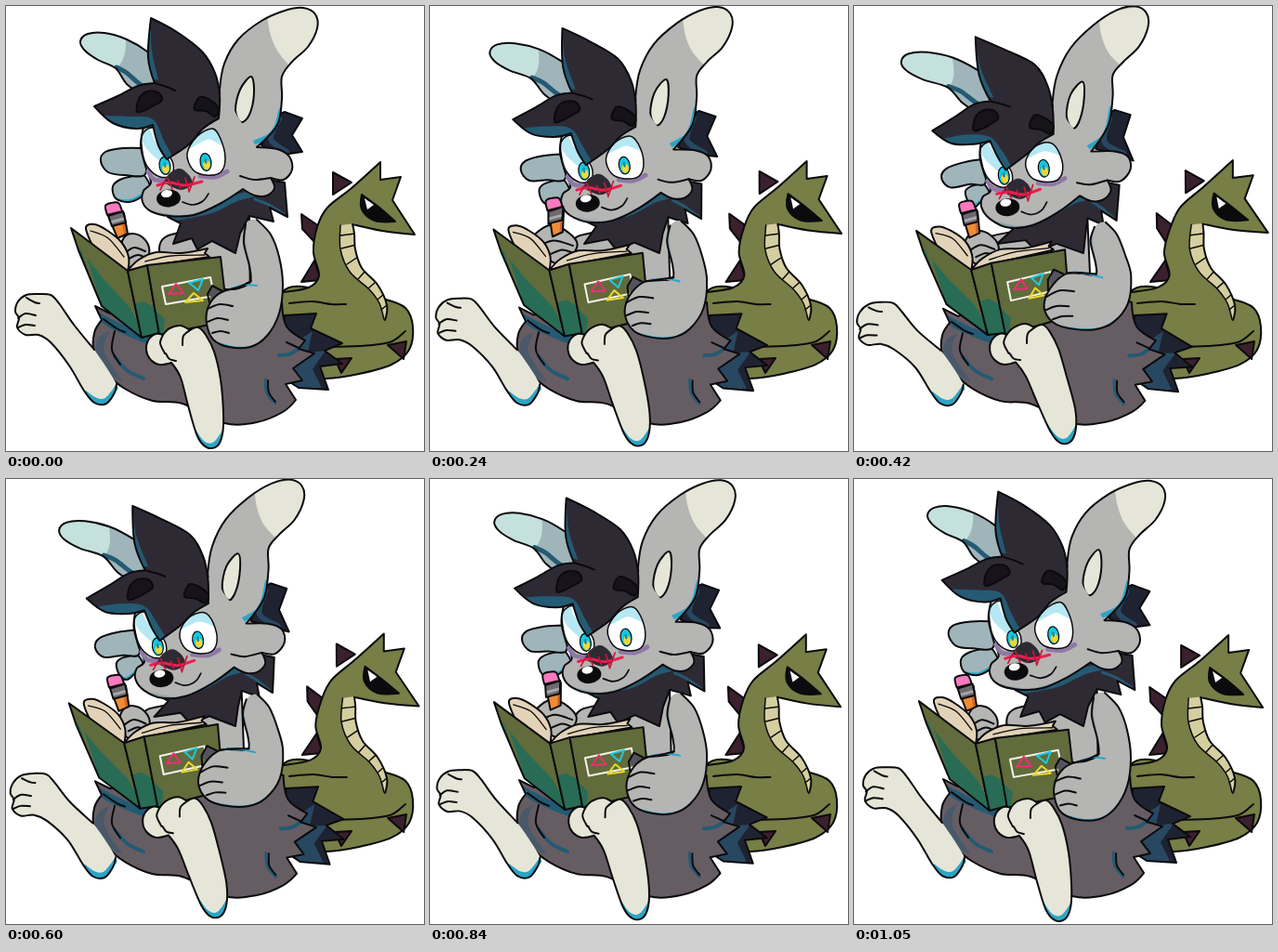
An HTML page with a canvas that plays this animation: 450 px wide and 479 px high, repeating every 1.08 s.

```html
<!DOCTYPE html>
<html>
<head>
<meta charset="utf-8">
<style>
html, body { margin: 0; width: 100%; height: 100%; overflow: hidden; background: #fff; }
canvas { display: block; }
</style>
</head>
<body>
<canvas id="stage" width="450" height="479"></canvas>
<script>
const ctx = document.getElementById('stage').getContext('2d');
const LOOP = 1080, STEP = 30;
const INK = '#0b0a0d', GREY = '#b5b5b3', COOL = '#9fb5ba', CREAM = '#e5e6d7', HAIR = '#2e2a34',
  NIGHT = '#1f2230', BLUE = '#2ba5c6', DEEP = '#245a73', CLOTH = '#665d63', SNAKE = '#777e46',
  SPIKE = '#3b202d', COVER = '#616b3b', SHADE = '#286c56', PAGE = '#e2d3b8';

// Pins: x, y and the shift at full lean; points between pins are blended.
const PINS = {
  head: [
    [156, 13, -26, 21], [95, 108, -11, 27], [80, 38, -30, 22], [335, 10, -19, -2],
    [297, 95, -19, -3], [258, 100, -20, 4], [172, 164, -10, 12], [175, 207, -10, 10],
    [308, 167, -10, -1], [319, 121, -22, -4], [319, 157, -19, 10], [102, 168, -8, 19],
    [118, 203, 6, 6], [154, 103, -13, 21], [216, 108, -14, 21], [171, 173, -10, 11],
    [215, 168, -11, 7], [229, 85, -17, 15], [175, 225, -10, 13], [148, 208, -10, 6]
  ],
  ruff: [[180, 256, -27, 0], [222, 253, -4, 3], [247, 266, 0, 0], [303, 227, -21, 4], [270, 185, -12, 2], [190, 220, -16, 8]],
  body: [[97, 325, 0, 3], [330, 350, 3, 0], [363, 364, 2, 4], [250, 445, 0, 0], [100, 400, 0, 0], [300, 325, 2, 0]],
  legs: [[10, 330, -7, 12], [45, 310, -6, 9], [105, 428, -2, 1], [110, 395, -1, 0], [220, 476, 6, -5], [152, 362, -5, 0], [214, 352, -4, -3]],
  snake: [[440, 246, 6, -2], [403, 168, 5, -2], [353, 179, 5, -2], [318, 225, 8, -1], [333, 270, 3, 0], [375, 265, 1, 0], [409, 320, 0, 0], [438, 350, 0, 0], [360, 390, 0, 0], [300, 310, 0, 0]],
  book: [[70, 240, -3, 3], [131, 285, -5, -1], [146, 357, -2, -3], [231, 270, -4, -8], [168, 302, -3, -5], [222, 300, -9, -6], [165, 352, -2, 0]],
  arm: [[217, 330, -11, -13], [235, 304, -7, -19], [245, 368, -4, -20], [296, 320, 1, -11], [262, 229, 1, 3], [288, 250, -2, 0], [259, 275, -2, -3]],
  hand: [[124, 258, -16, -10], [135, 246, -5, -11], [153, 262, 5, -7], [138, 279, 0, -5]],
  pencil: [[117, 218, 21, -6], [125, 245, 14, -2]]
};

const LEAN = [[0, 0], [240, .52], [420, .97], [480, 1], [600, .76], [720, .53], [930, .23], [1050, .03], [1080, 0]];
const SCRIBBLE = [[0, 0], [60, .1], [180, 1], [240, .85], [390, .45], [420, .3], [510, .08], [540, 0]];

let pins, mix, pose;

function follow(keys, t) {
  const i = keys.findIndex(k => k[0] > t);
  const [t0, a] = keys[i - 1], [t1, b] = keys[i];
  return a + (b - a) * (t - t0) / (t1 - t0);
}

function use(name) {
  pins = PINS[name];
  mix = name === 'hand' || name === 'pencil' ? pose.scribble : pose.lean;
}

function warp(x, y) {
  let sx = 0, sy = 0, sum = 0;
  for (const [px, py, dx, dy] of pins) {
    const w = 1 / (Math.hypot(x - px, y - py) ** 3 + 50);
    sx += w * dx; sy += w * dy; sum += w;
  }
  return [x + mix * sx / sum, y + mix * sy / sum];
}

// Smooth curve through points; "*" marks a corner, a leading "!" makes all corners.
function trace(text, closed) {
  const sharp = text[0] === '!';
  const pts = [...text.matchAll(/(\d+) (\d+)(\*?)/g)].map(m => ({ at: warp(+m[1], +m[2]), corner: sharp || m[3] }));
  const n = pts.length, path = new Path2D();
  const get = i => closed ? pts[(i + n) % n] : pts[Math.max(0, Math.min(n - 1, i))];
  const handle = (i, sign) => {
    const p = get(i), a = get(i - 1).at, b = get(i + 1).at;
    return p.corner ? p.at : p.at.map((v, k) => v + sign * (b[k] - a[k]) / 6);
  };
  path.moveTo(...pts[0].at);
  for (let i = 0; i < (closed ? n : n - 1); i++)
    path.bezierCurveTo(...handle(i, 1), ...handle(i + 1, -1), ...get(i + 1).at);
  if (closed) path.closePath();
  return path;
}

function fill(text, color) {
  ctx.fillStyle = color;
  ctx.fill(trace(text, true));
}

function line(text, color = INK, width = 2) {
  ctx.strokeStyle = color;
  ctx.lineWidth = width;
  ctx.stroke(trace(text, false));
}

// A filled outline; details are clipped to it before the ink goes on.
function part(text, color, details, ink = INK, width = 2) {
  const path = trace(text, true);
  ctx.fillStyle = color;
  ctx.fill(path);
  if (details) {
    ctx.save();
    ctx.clip(path);
    details();
    ctx.restore();
  }
  if (ink) {
    ctx.strokeStyle = ink;
    ctx.lineWidth = width;
    ctx.stroke(path);
  }
}

function oval(x, y, rx, ry, color, tilt = 0) {
  ctx.beginPath();
  ctx.ellipse(...warp(x, y), rx, ry, tilt, 0, 7);
  ctx.fillStyle = color;
  ctx.fill();
}

function drawSnake() {
  use('snake');
  part('!372 190 352 179 352 203', SPIKE);
  part('!337 237 318 224 319 240 333 255', SPIKE);
  part('!332 274 318 297 339 295', SPIKE);
  part('298 308 325 303 350 318 390 310 409 316* 430 325 438 345 434 370 415 386 380 396 345 401 315 398 296 350', SNAKE);
  part('440 246* 416 209* 425 184* 403 187* 403 168* 372 196 346 217 335 238 331 265 337 290 326 303 299 308* 303 319 340 318 368 323 395 334 408 338* 410 322 400 300 383 282 376 262 375 245 373 235* 405 242', SNAKE, () => {
    fill('360 236* 360 262 370 286 391 305 402 320 408 338* 414 322 400 298 384 281 378 262 376 234*', '#d5cea0');
    line('360 236 360 262 370 286 391 305 402 320 407 338', INK, 1.5);
    for (const rung of ['360 247 376 245', '361 261 377 257', '367 278 379 270', '379 294 387 285', '390 304 398 297', '400 316 407 310', '404 327 411 321'])
      line(rung, INK, 1.5);
  }, null);
  line('408 338* 410 322 400 300 383 282 376 262 375 245 373 235* 405 242 440 246* 416 209* 425 184* 403 187* 403 168* 372 196 346 217 335 238 331 265 337 290 326 303 299 308');
  line('305 320 330 318 350 321 366 321');
  line('340 367 380 366 413 362 430 350');
  part('383 203* 402 217 419 232* 397 231 383 219', INK);
  fill('!386 207 396 214 389 219', '#fff');
  part('!354 380 372 379 361 395', SPIKE);
  part('!411 365 431 361 428 380', SPIKE);
}

function drawBody() {
  use('body');
  part('!300 333 334 331 328 347 362 363 343 371 362 385 338 388 347 413 315 411 295 398', NIGHT, () => {
    fill('!300 370 330 350 325 373 344 371 330 391 340 411 312 413', '#284760');
  });
  use('ruff');
  part('178 246* 262 225* 263 330* 180 330* 165 262', GREY);
  use('body');
  part('112 331* 96 323* 103 338* 95 352 95 374 108 395 128 412 158 425 190 428 235 449 270 448 298 437 312 424* 301 407* 319 403* 309 390* 332 374* 315 369* 322 360* 302 345 297 319* 240 305 170 315', CLOTH, () => {
    fill('100 330* 130 345 155 355 158 366* 130 355 105 342', DEEP);
    fill('112 350* 106 372 126 404* 98 390 98 360', '#49596a');
    line('117 377 130 392 148 401', DEEP, 4);
    line('279 402 281 417 290 428', DEEP, 3);
    line('323 363 307 374 294 376', DEEP, 4);
  });
  line('105 337 119 347 128 351');
  line('117 350 114 370 123 386');
  line('282 403 283 416 290 426');
  line('302 362 315 368');
}

function drawFarLeg() {
  use('legs');
  const shape = '95 370 73 343 57 320 48 311 34 310 22 311 13 318 10 329 14 336 12 346 21 354 35 354 48 362 68 387 84 414 95 427 108 428 117 416 119 407';
  part(shape, CREAM, () => fill('86 414* 98 422 108 421 120 405* 125 425 106 438 88 426', BLUE), null);
  line(shape);
  line('13 336 21 331 32 333');
  line('13 346 21 343 31 344');
  line('22 314 31 319 36 320');
}

function drawEars() {
  use('head');
  part('165 96* 146 94 130 84 118 67 99 58 85 48 80 38 88 30 106 29 130 36 152 49 165 62', COOL, () => {
    fill('75 20* 126 20* 129 40 126 57 116 72* 70 70*', '#c5e1dd');
    line('165 96 144 84 130 72 119 66', DEEP, 5);
  });
  part('230 90* 235 62 250 36 275 16 300 5 320 2 333 9 335 24 325 44 308 60 297 76 297 100 292 128 270 152* 232 140*', GREY, () => {
    fill('281 5* 284 28 292 48 307 66* 345 40* 340 0*', CREAM);
    line('265 148 283 140 291 130 296 112', BLUE, 5);
  });
  part('264 76 267 94 262 117 253 125 247 112 252 90', CREAM);
}

function drawHead() {
  use('head');
  part('!290 118 300 114 319 121 308 139 319 157 298 160 275 150', NIGHT, () => line('294 121 285 143 302 157', '#284760', 6));
  use('ruff');
  part('!190 215 174 227 188 234 180 256 200 250 206 262 222 253 247 266 252 245 262 226 288 232 284 217 303 227 300 190 270 185', HAIR, () => {
    line('180 228 220 220 250 206 285 199', DEEP, 7);
    line('268 208 283 214 299 224', DEEP, 3);
  });
  use('head');
  part('148 181* 125 186 115 194 118 207 132 211 145 206 155 195', COOL, () => line('118 209 134 210 148 203', BLUE, 4));
  part('148 153* 126 153 107 157 102 167 110 179 128 182 150 181', COOL);
  drawEars();
  part('148 130* 145 150 150 172 156 190 148 199 147 211 156 221 176 226 202 225 230 213 255 197* 268 204 281 204 289 196 285 185* 299 187 308 176 305 162 292 154 270 152* 250 120 232 95 180 90', GREY, () => {
    line('158 223 190 227 220 219 255 199', '#8fa3aa', 4);
  }, null);
  line('148 130 145 150 150 172 156 190 148 199 147 211 156 221 176 226 202 225 230 213 255 197* 268 204 281 204 289 196 285 185* 299 187 308 176 305 162 292 154 270 152');
  line('252 183 267 187 285 185');
}

function drawFace() {
  line('153 178 160 187 176 187', '#8f79a5', 5);
  line('209 183 225 184 238 178', '#8f79a5', 5);
  part('147 138 160 132 174 158 180 170 178 182 166 184 153 174 147 158', '#fff', () => {
    line('150 136 156 150 170 163', '#b5e8f3', 12);
  }, INK, 1.5);
  part('195 159 205 141 222 132 231 143 236 164 231 179 215 182 201 176', '#fff', () => {
    line('198 146 218 137 238 146', '#b5e8f3', 13);
  }, INK, 1.5);
  for (const [x, y] of [[171, 172], [215, 168]]) {
    oval(x, y, 6.5, 10, INK, -.15);
    oval(x, y, 5.3, 8.8, '#16c6df', -.15);
    oval(x + 1, y + 3, 3.7, 5, '#f5d632', -.15);
    oval(x, y - 1, 1.5, 3, '#168eac', -.15);
  }
  fill('170 190* 176 180 187 175 197 182 202 192* 188 198', HAIR);
  oval(175, 207, 13, 9.5, INK, -.1);
  oval(173, 202, 6, 4, '#fff', -.15);
  line('190 211 201 214 212 210 218 202', INK, 1.7);
  line('163 193 176 190 192 193 211 189', '#ed1e50', 3);
  for (const tick of ['174 185 179 197', '193 185 197 199', '203 184 197 200', '185 188 188 196', '166 198 171 188'])
    line(tick, '#c91838', 1.7);
}

function drawHair() {
  part('156 13* 184 28 211 49 225 72 230 96 229 121* 212 132 197 149 173 165* 164 150 158 128* 140 132 115 126 95 108* 120 97 142 86 160 83* 153 55', HAIR, () => {
    fill('156 13* 157 48 165 82* 158 86* 148 55', DEEP);
    fill('105 118* 132 119 158 122 170 145 180 163* 165 165* 155 135 120 135', DEEP);
    fill('95 108* 125 112 154 114 172 125 181 152 193 142 210 129 231 112* 225 90* 160 79* 115 95', HAIR);
  });
  line('160 83 173 87 182 91');
  part('141 114 143 100 152 92 164 93 168 101 161 106 150 112', '#16131a', null, INK, 2);
  part('203 107 209 98 221 102 229 111 225 119 215 113 204 112', '#16131a', null, INK, 2);
}

function drawHand() {
  use('hand');
  part('132 280 125 270 124 258 128 248 136 245 147 249 154 260 152 272 142 281', GREY);
  line('128 266 138 260 150 264');
  line('132 272 142 268 150 271');
  use('pencil');
  part('!111 228 127 223 131 245 120 250', '#f18b35', () => line('126 224 130 249', '#c86a2c', 5));
  part('!110 226 126 221 129 233 114 237', '#6c6970', () => line('112 233 130 228', '#a8a7a9', 3));
  part('109 225* 107 215 113 212 121 212 125 221*', '#f67abd');
}

function drawBook() {
  use('book');
  part('86 239 95 235 108 241 124 254 132 270 131 286* 95 262*', PAGE);
  part('131 285* 143 273 162 265 188 266 217 261* 214 266* 219 270* 152 280*', PAGE);
  line('91 242 110 250 127 270', INK, 1.3);
  line('150 275 178 269 214 268', INK, 1.3);
  part('!70 239 131 285 146 357 103 323 78 263', COVER, () => {
    fill('!77 258 106 295 133 324 153 360 100 328', SHADE);
    line('81 257 98 311', COVER, 3);
  });
  part('!131 285 152 279 165 352 146 357', COVER, () => fill('!133 322 148 318 159 324 169 360 143 362', SHADE));
  part('!152 279 231 270 239 339 165 354', COVER, () => fill('!156 323 171 337 168 360 157 352', SHADE));
  ctx.strokeStyle = '#f4f4ee';
  ctx.lineWidth = 2;
  ctx.stroke(trace('!168 302 220 292 224 312 172 321', true));
  for (const [tri, color] of [['!175 310 183 299 191 309', '#ee2d76'], ['!197 298 212 294 207 306', '#20c9de'], ['!193 319 202 309 212 317', '#ecd82c']]) {
    ctx.strokeStyle = color;
    ctx.stroke(trace(tri, true));
  }
}

function drawArm() {
  use('arm');
  fill('!217 310 222 301 232 307 227 320', '#55535c');
  line('!219 319 217 310 222 301 235 308');
  const shape = '258 235 256 255 262 280 263 297 250 304 237 306 225 313 217 326 216 342 223 359 240 367 263 367 281 355 294 331 298 300 294 270 285 246 270 230';
  part(shape, GREY, () => {
    line('223 362 248 368 270 365 287 349', BLUE, 3);
    line('258 235 257 255 263 282', '#7f9ca7', 2);
  }, null);
  line(shape);
  line('217 326 230 321 244 323');
  line('217 340 228 336 239 338');
  line('222 352 231 350 240 352');
  line('243 304 257 300 270 301', BLUE, 2);
  line('237 306 252 302 264 296');
}

function drawNearLeg() {
  use('legs');
  part('178 384* 165 386 155 380 151 370 153 360 161 353 169 354* 176 347 188 344 198 349* 207 346 215 354 224 372 231 402 234 438 233 461 227 474 216 475 206 463 196 430 188 400', CREAM, () => {
    fill('202 452* 213 468 224 469 237 450* 238 480 206 480', BLUE);
    line('177 385 188 404 191 416', BLUE, 3);
  });
  line('169 354 166 363 171 374');
  line('198 349 191 355 190 365');
  line('172 374 176 380 183 382');
}

function draw() {
  const t = Math.floor(performance.now() % LOOP / STEP) * STEP;
  pose = { lean: follow(LEAN, t), scribble: follow(SCRIBBLE, t % 540) };
  ctx.fillStyle = '#fff';
  ctx.fillRect(0, 0, 450, 479);
  ctx.lineJoin = ctx.lineCap = 'round';
  drawSnake();
  drawBody();
  drawFarLeg();
  drawHead();
  drawFace();
  drawHair();
  drawHand();
  drawBook();
  drawArm();
  drawNearLeg();
  requestAnimationFrame(draw);
}
draw();
</script>
</body>
</html>
```
